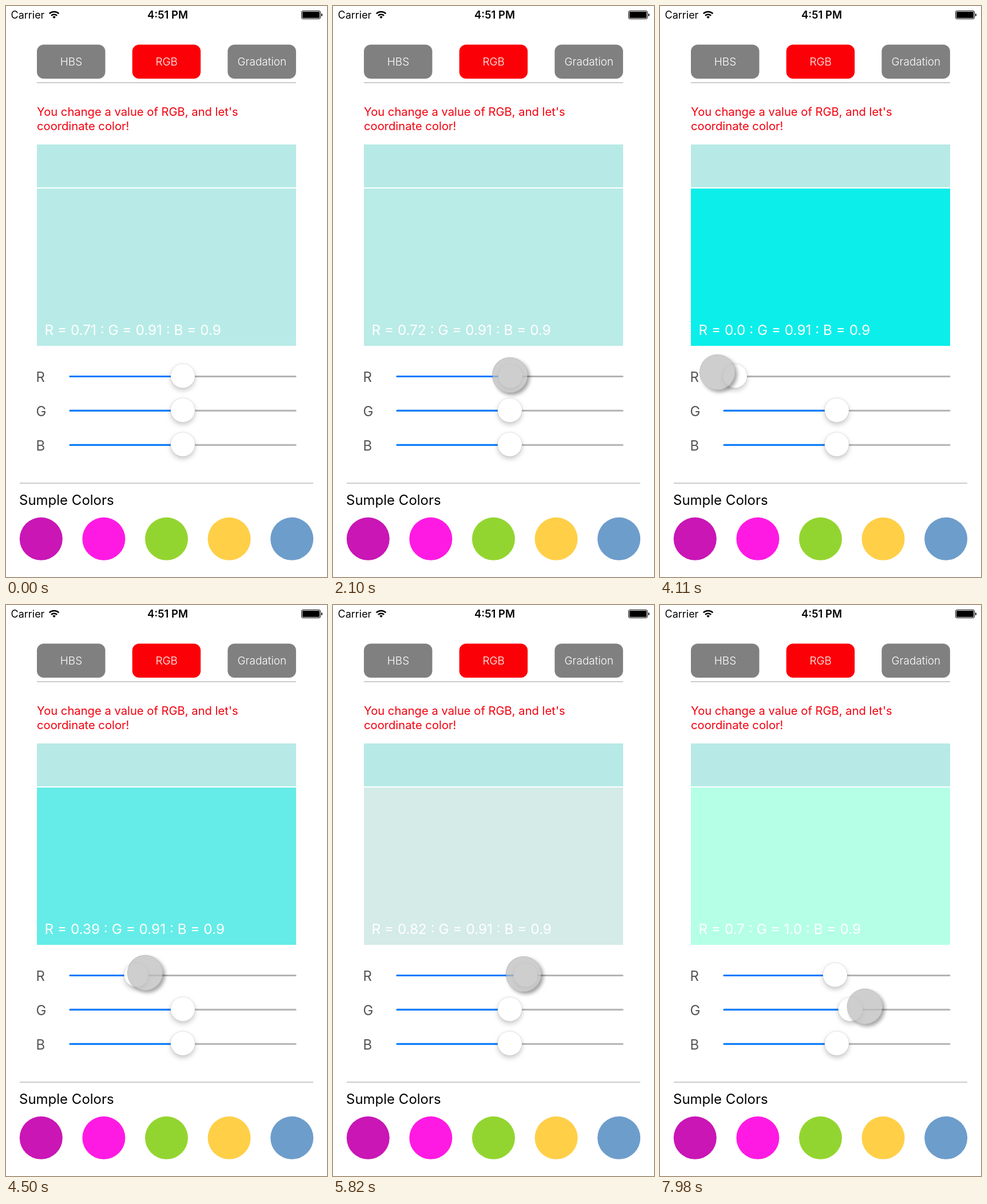
An HTML page that plays this animation: 561 px wide and 998 px high, repeating every 8 s.

```html
<!DOCTYPE html>
<html lang="en">
<head>
<meta charset="utf-8">
<title>RGB color picker</title>
<style>
html, body { margin: 0; width: 100%; height: 100%; overflow: hidden; background: #fff; }
svg { position: absolute; left: 0; top: 0; font: 24px Inter, "Open Sans", sans-serif; }
.thumb { fill: #fff; stroke: rgba(0,0,0,.13); stroke-width: .8; filter: drop-shadow(0 4px 4px rgba(0,0,0,.22)); }
#touch {
  position: absolute; left: -31px; top: -31px; width: 62px; height: 62px;
  box-sizing: border-box; border: 1.5px solid rgba(150,150,150,.65); border-radius: 50%;
  background: rgba(190,190,190,.75); background-clip: padding-box;
  box-shadow: 4px 4px 6px rgba(0,0,0,.36);
}
</style>
</head>
<body>
<svg width="561" height="998" viewBox="0 0 561 998">
  <g font-size="18">
    <text x="8.5" y="22">Carrier</text>
    <text x="282.5" y="22" text-anchor="middle" font-size="18.5" font-weight="600">4:51 PM</text>
  </g>
  <g fill="none" stroke="#000" stroke-width="2.4">
    <path d="M75.8 13.4a12 12 0 0 1 16.6 0M79 16.8a7.3 7.3 0 0 1 10.2 0"/>
    <path d="M81.4 19a4 4 0 0 1 5.4 0L84.1 22z" fill="#000" stroke="none"/>
    <rect x="516.5" y="8.5" width="33" height="14" rx="2.5" stroke-width="1"/>
    <rect x="518" y="10" width="30" height="11" rx="1.2" fill="#000" stroke="none"/>
    <path d="M551 13q2 0 2 2.5t-2 2.5z" fill="#000" stroke="none"/>
  </g>
  <g id="tabs" font-size="19" font-weight="300" text-anchor="middle"></g>
  <path d="M54 134H507" stroke="#bbb" stroke-width="1.5"/>
  <g font-size="20.2" fill="#f3000e">
    <text x="54" y="192">You change a value of RGB, and let's</text>
    <text x="54" y="216.5">coordinate color!</text>
  </g>
  <path d="M54 242H507V317H54z" fill="#b7eae6"/>
  <path id="panel" d="M54 319H507V594H54z"/>
  <text id="label" x="67.5" y="575" font-size="24.3" fill="#fff"></text>
  <g id="sliders"></g>
  <path d="M24 834H537" stroke="#ccc" stroke-width="2"/>
  <text x="23" y="872">Sumple Colors</text>
  <g id="swatches"></g>
</svg>
<div id="touch"></div>
<script>
const STEP = 30, LOOP = 8000, REST = 309;
const $ = id => document.getElementById(id);
const clamp = (v, lo, hi) => Math.max(lo, Math.min(hi, v));
const rowY = i => 647.5 + i * 59.84;

$("tabs").innerHTML = ["HBS", "RGB", "Gradation"].map((name, i) => {
  const x = 54 + i * 166.7;
  return `<rect x="${x}" y="67.5" width="119.5" height="59.5" rx="12" fill="${i === 1 ? "#fb0007" : "#808080"}"/>
    <text x="${x + 60}" y="104" fill="#fff">${name}</text>`;
}).join("");

$("sliders").innerHTML = ["R", "G", "B"].map((name, i) =>
  `<text x="52.5" y="${rowY(i) + 9.8}" fill="#555">${name}</text>
    <g fill="none" stroke-width="3" stroke-linecap="round">
      <path d="M112 ${rowY(i)}H506" stroke="#b3b3b3"/>
      <path id="fill${i}" stroke="#007aff"/>
    </g>
    <circle id="thumb${i}" class="thumb" cy="${rowY(i) - 1}" r="21.3"/>`).join("");

$("swatches").innerHTML = ["#c916b5", "#ff1ae3", "#93d530", "#ffcf48", "#6d9dcb"].map((color, i) =>
  `<circle cx="${61.3 + i * 109.6}" cy="931.3" r="37.5" fill="${color}"/>`).join("");

// Smooth curve through [time, value] keys that never overshoots them.
function spline(keys) {
  const slope = i => keys[i] && keys[i + 1]
    ? (keys[i + 1][1] - keys[i][1]) / (keys[i + 1][0] - keys[i][0]) : 0;
  const tangent = i => {
    const a = slope(i - 1), b = slope(i);
    return a * b > 0 ? 2 * a * b / (a + b) : 0;
  };
  return t => {
    const i = Math.max(0, keys.findIndex(k => k[0] > t) - 1);
    const [t0, v0] = keys[i], [t1, v1] = keys[i + 1];
    const d = t1 - t0, p = clamp((t - t0) / d, 0, 1), q = 1 - p;
    return v0 + (v1 - v0) * p * p * (3 - 2 * p) + d * p * q * (q * tangent(i) - p * tangent(i + 1));
  };
}

const touchX = spline([
  [330, 478], [360, 423], [510, 423], [840, 259], [990, 307],
  [2040, 307], [2100, 309], [2850, 265], [3000, 238.5], [3300, 165], [4110, 100],
  [4860, 429], [5190, 513], [5370, 513], [5790, 334.5], [6780, 304],
  [7890, 310], [8130, 460]
]);
const touchY = spline([
  [330, 699], [510, 718], [960, 645], [3030, 645], [4110, 640], [4860, 645],
  [6900, 645], [7140, 682], [7620, 698], [8130, 702]
]);

// A dragged thumb keeps its offset to the grab point and trails by one step.
const drag = (t, grab, release) =>
  clamp(REST + touchX(clamp(t - STEP, grab, release)) - touchX(grab), 131, 487);

const level = (base, x) => clamp(base + (x - REST) * .004, 0, 1);
const show = v => v.toFixed(2).replace(/0$/, "");

function draw() {
  const t = Math.floor(performance.now() % LOOP / STEP) * STEP;
  const thumbs = [drag(t, 2040, 6780), drag(t, 7890, LOOP), REST];
  thumbs.forEach((x, i) => {
    $("thumb" + i).setAttribute("cx", x);
    $("fill" + i).setAttribute("d", `M112 ${rowY(i)}H${x}`);
  });

  const [r, g, b] = [.713, .911, .9].map((base, i) => level(base, thumbs[i]));
  $("label").textContent = `R = ${show(r)} : G = ${show(g)} : B = ${show(b)}`;
  const rgb = [Math.max(12, 255 * r + 2), 238 - 4 * r + (g - .911) * 222, 234 - 4 * r];
  $("panel").setAttribute("fill", `rgb(${rgb.map(Math.round)})`);

  const pressed = t >= 1140 && t < 6930 || t >= 7620;
  const touch = $("touch").style;
  touch.display = t < 330 ? "none" : "block";
  touch.transform = `translate(${touchX(t)}px, ${touchY(t)}px)`;
  touch.backgroundColor = `rgba(190,190,190,${pressed ? .75 : .65})`;
  requestAnimationFrame(draw);
}
draw();
</script>
</body>
</html>
```
